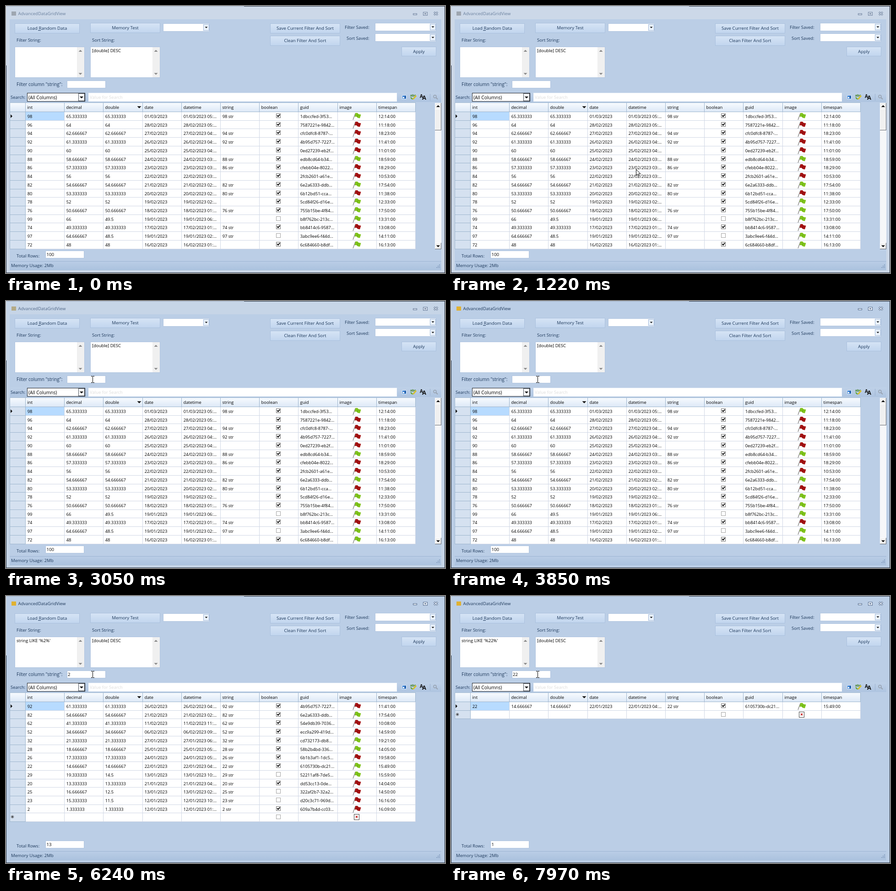
An HTML page with a canvas that plays this animation: 959 px wide and 584 px high, repeating every 8 s.

```html
<!DOCTYPE html>
<html lang="en">
<head>
<meta charset="utf-8">
<title>AdvancedDataGridView</title>
<style>
  html, body { margin: 0; width: 100%; height: 100%; overflow: hidden; background: #bbcee6; }
  canvas { display: block; }
</style>
</head>
<body>
<canvas id="stage" width="959" height="584"></canvas>
<script>
const ctx = document.getElementById('stage').getContext('2d');
const LOOP = 8000, ROW = 18.73, GRID_TOP = 231;
const PANEL = '#bbcee6', NAVY = '#1e395b', LINE = '#d0d7e5', EDGE = '#9eb6ce';
const HEADERS = ['int', 'decimal', 'double', 'date', 'datetime', 'string', 'boolean', 'guid', 'image', 'timespan'];

// int, guid, flag colour, timespan; the other columns follow from int
const records = new Map(`98 1dbccfed-3f53 G 12:14
96 7587221e-9842 R 11:18
94 cfc0dfc8-8787- R 18:23
92 4b95d757-7227 R 11:41
90 0ed27239-eb2f R 11:01
88 edb8cd64-b34 G 18:59
86 cfebb04e-8022 R 18:29
84 2fcb2601-a61e R 10:53
82 6e2a6333-ddb G 17:54
80 6b12bd51-cca R 11:38
78 5cd84f26-d16e G 12:33
76 755b15be-4f84 G 17:50
99 b8f762bc-213c G 13:31
74 bb8414c6-9587 R 13:08
97 3abc9ee6-f44d G 14:11
72 6c684660-b8df G 16:13
62 54e9db39-7036 R 10:08
52 ecc9a299-419d R 14:59
32 cd732173-db8 G 19:21
28 58b2b4bd-336 G 14:05
26 6b1b3af1-1dc5 R 19:58
22 6105730b-dc21 G 15:49
29 52211af8-7de5 G 15:59
20 dd53cc13-0de R 14:04
25 322af2b7-32a2 R 14:50
23 d20c3c71-969d R 16:16
2 609a7b4d-cc03 R 16:09`.split('\n').map(line => {
  const [id, guid, flag, time] = line.split(' ');
  return [+id, { id: +id, guid: guid + '...', flag, time: time + ':00' }];
}));
const allRows = [...records.keys()].slice(0, 16);
const rowsWith2 = [92, 82, 62, 52, 32, 28, 26, 22, 29, 20, 25, 23, 2];

const colX = i => Math.round(42 + 85.2 * i);
const rowY = i => Math.round(GRID_TOP + ROW * i);
const trim = n => String(+n.toFixed(6));
const pad = n => String(n).padStart(2, '0');
const mix = (a, b, u) => a + (b - a) * u;
const blend = (a, b, u) => `rgb(${a.map((v, i) => Math.round(mix(v, b[i], u)))})`;

function cells({ id, guid, time }) {
  const odd = id % 2;
  const day = new Date(Date.UTC(2023, 0, 11 + Math.floor(id / (odd ? 12 : 2))));
  const date = `${pad(day.getUTCDate())}/${pad(day.getUTCMonth() + 1)}/2023`;
  const hour = (odd ? id * 2 : Math.floor(id / 6) + 1) % 12 || 12;
  return [id, trim(id * 2 / 3), trim(odd ? id / 2 : id * 2 / 3), date,
    `${date} ${pad(hour)}:...`, id % 3 ? id + ' str' : '', '', guid, '', time];
}

function fill(x, y, w, h, color) {
  ctx.fillStyle = color;
  ctx.fillRect(x, y, w, h);
}
function shade(y, h, top, bottom) {
  const g = ctx.createLinearGradient(0, y, 0, y + h);
  g.addColorStop(0, top);
  g.addColorStop(1, bottom);
  return g;
}
function box(x, y, w, h, inside, border) {
  fill(x, y, w, h, border);
  fill(x + 1, y + 1, w - 2, h - 2, inside);
}
function text(s, x, middle, size = 9.6, color = NAVY, align = 'left', weight = 400) {
  ctx.font = `${weight} ${size}px "Open Sans", "Noto Sans", sans-serif`;
  ctx.textAlign = align;
  ctx.fillStyle = color;
  ctx.fillText(s, x, middle + 3.5);
}
function poly(points, color, stroke) {
  ctx.beginPath();
  points.forEach(([x, y]) => ctx.lineTo(x, y));
  ctx.closePath();
  ctx.fillStyle = color;
  ctx.fill();
  if (stroke) { ctx.strokeStyle = stroke; ctx.lineWidth = 1; ctx.stroke(); }
}
function path(points, color, width = 1) {
  ctx.beginPath();
  points.forEach(([x, y]) => ctx.lineTo(x, y));
  ctx.strokeStyle = color;
  ctx.lineWidth = width;
  ctx.stroke();
}
// dir 1 points down, -1 points up
function arrow(x, y, r, dir, color) {
  poly([[x - r, y - dir * r / 2], [x + r, y - dir * r / 2], [x, y + dir * r / 2]], color);
}

function button(label, x, y, w, h) {
  box(x, y, w, h, shade(y, h, '#d6e4f5', '#c1d5ee'), '#abc1de');
  text(label, x + w / 2, y + h / 2 - 0.5, 9.7, NAVY, 'center');
}
function combo(x, y, w) {
  box(x, y, w, 18, '#fff', '#b1c5e0');
  box(x + w - 14, y + 2, 13, 14, '#eaf2fc', '#9fb8d9');
  arrow(x + w - 7.5, y + 9, 3, 1, '#111');
}
function memo(x, content) {
  box(x, 89, 153, 68, '#fff', '#b1c5e0');
  fill(x + 136, 90, 16, 66, '#f0f0f0');
  arrow(x + 143.5, 98, 4, -1, '#868686');
  arrow(x + 143.5, 148.5, 4, 1, '#868686');
  text(content, x + 4, 97, 9.5, '#000');
}

function windowFrame(active) {
  fill(0, 0, 959, 584, '#2b3442');
  fill(0, 0, 520, 1, '#a9b7ca');
  fill(0, 0, 1, 130, '#dfe5ee');
  fill(1, 1, 957, 582, blend([204, 216, 232], [187, 206, 230], active));
  fill(8, 29, 943, 549, PANEL);

  fill(12, 12, 10, 9, blend([158, 166, 176], [224, 177, 50], active));
  text('AdvancedDataGridView', 26.5, 16.5, 9.5, blend([106, 128, 158], [30, 57, 91], active));
  ctx.globalAlpha = 0.75 + 0.25 * active;
  box(889, 16, 9, 4, '#eef4fc', '#53698a');
  box(911, 13, 10, 8, '#eef4fc', '#53698a');
  fill(914, 16, 4, 2, '#53698a');
  for (const [color, width] of [['#53698a', 3.6], ['#eef4fc', 1.4]]) {
    path([[935, 13], [943, 20]], color, width);
    path([[943, 13], [935, 20]], color, width);
  }
  ctx.globalAlpha = 1;
}

function topPanel(filter, typed, caret) {
  button('Load Random Data', 19, 38, 142, 22);
  fill(70, 53, 6, 1, NAVY);
  button('Memory Test', 184, 37, 153, 22);
  button('Save Current Filter And Sort', 577, 38, 153, 22);
  button('Clean Filter And Sort', 577, 65, 153, 22);
  button('Apply', 864, 89, 76, 21);
  combo(343, 38, 102);
  combo(806, 37, 134);
  combo(806, 60, 134);
  text('Filter String:', 23, 74);
  text('Sort String:', 188, 74);
  text('Filter Saved:', 740, 46, 9.5);
  text('Sort Saved:', 744, 70, 9.5);
  memo(19, filter);
  memo(184, '[double] DESC');
  text('Filter column "string":', 23, 171, 10);
  box(133, 163, 85, 17, '#fff', '#b1c5e0');
  text(typed, 135, 171, 9.6, '#000');
  if (caret) fill(135 + Math.round(typed.length * 5.5), 164, 1, 13, '#000');
}

function searchBar(hover) {
  fill(8, 189, 943, 21, shade(189, 21, '#bfd1e8', '#aec4e0'));
  text('Search:', 10, 199.5, 9.5);
  box(46, 190, 127, 19, '#fff', '#1f2329');
  box(158, 191, 14, 17, '#f6f7f9', '#4d545d');
  text('(All Columns)', 49, 200.5, 10.2, '#000');
  arrow(165, 200, 4, 1, '#000');
  box(180, 190, 674, 19, '#fff', hover ? '#6d9bd3' : '#f4f7fb');
  text('Value for Search', 183, 199.5, 9.5, '#dcdcdc');

  box(865, 195, 10, 9, '#3f86d6', '#d6e6f8');
  fill(867, 199, 3, 3, '#fff');
  fill(871, 196, 2, 6, '#1c4f96');
  text('abc', 883, 194.5, 7, '#3b7d16', 'left', 700);
  path([[896, 196], [889, 204]], '#d8bf28', 3);
  path([[884, 200], [888, 204]], '#55a020', 2);
  text('A', 904, 197.5, 10, '#111', 'left', 700);
  text('A', 909, 201, 13, '#111', 'left', 700);
  fill(926, 192, 1, 15, '#9db3d0');
  ctx.beginPath();
  ctx.arc(937, 198, 3, 0, 7);
  ctx.strokeStyle = '#96a1af';
  ctx.lineWidth = 1.4;
  ctx.stroke();
  path([[939.5, 200.5], [943, 204]], '#96a1af', 2);
}

function checkbox(middle, checked) {
  box(590, middle - 5, 10, 10, '#fff', checked ? '#707070' : '#a3a3a3');
  if (checked) path([[592.3, middle - 1], [594.3, middle + 1.8], [598.2, middle - 2.6]], '#000', 1.8);
}
function flag(y, kind) {
  const [main, dark] = kind === 'G' ? ['#80c41c', '#62a010'] : ['#a51212', '#780a0a'];
  path([[758, y + 8], [763.3, y - 6.5]], '#8d8d8d', 1.5);
  poly([[763.5, y - 7], [768, y - 7], [770, y - 4.5], [775.5, y - 3.5], [773, y + 4.5], [768, y + 3.5], [766, y + 1], [761.5, y + 1]], main);
  path([[769.5, y - 4], [767, y + 2]], dark, 1);
}

function grid(ids, withNewRow) {
  const count = ids.length + withNewRow;
  const bottom = rowY(count);
  fill(8, 211, 886, 21, shade(211, 21, '#f8fbff', '#dce8f6'));
  fill(8, GRID_TOP, 886, bottom - GRID_TOP, '#fff');
  fill(8, 232, 34, bottom - 232, '#d5e1f0');
  fill(43, 232, 84, rowY(1) - 232, '#b7dbff');

  for (let i = 0; i <= count; i++) {
    fill(42, rowY(i), 852, 1, i ? LINE : EDGE);
    fill(8, rowY(i), 34, 1, EDGE);
  }
  for (let i = 0; i <= 10; i++) {
    fill(colX(i), 211, 1, 21, EDGE);
    fill(colX(i), 232, 1, bottom - 231, i ? LINE : EDGE);
  }
  fill(8, 211, 886, 1, EDGE);
  fill(8, 211, 1, bottom - 210, EDGE);
  HEADERS.forEach((name, i) => text(name, colX(i) + 4.5, 221.5, 9.4, '#000'));
  arrow(291, 221.5, 4.5, 1, '#111');
  poly([[10, 237], [14, 241], [10, 245]], '#111');

  ids.forEach((id, r) => {
    const record = records.get(id), y = Math.round(241 + ROW * r);
    cells(record).forEach((s, i) => text(s, colX(i) + 4.7, y, 9.35, '#000'));
    checkbox(y - 1, id % 2 === 0);
    flag(y, record.flag);
  });
  if (withNewRow) {
    const y = Math.round(241 + ROW * ids.length) - 1;
    for (const [dx, dy] of [[3.5, 0], [0, 3.5], [2.5, 2.5], [2.5, -2.5]])
      path([[14 - dx, y - dy], [14 + dx, y + dy]], '#333', 0.9);
    checkbox(y, false);
    box(760, y - 6, 12, 13, '#fff', '#444');
    path([[764, y - 2], [768, y + 2]], '#c01010', 1.5);
    path([[768, y - 2], [764, y + 2]], '#c01010', 1.5);
  } else {
    fill(937, 212, 14, 320, '#f6f7f9');
    for (const [y, h] of [[212, 14], [225, 47], [518, 14]]) {
      box(937, y, 14, h, '#f0f0f0', '#666a70');
      fill(937, y, 13, 1, '#fff');
      fill(937, y, 1, h - 1, '#fff');
    }
    arrow(944, 219, 4, -1, '#000');
    arrow(944, 525.5, 4, 1, '#000');
  }
}

function footer(total) {
  text('Total Rows:', 23, 546, 9.6);
  box(86, 535, 85, 17, '#fff', '#b1c5e0');
  text(total, 88.5, 543.5, 9.6, '#000');
  fill(8, 558, 943, 20, shade(558, 20, '#bacde6', '#abc2de'));
  fill(8, 558, 943, 1, '#9db5d3');
  text('Memory Usage: 2Mb', 11, 567.5, 9.65);
  for (let i = 0; i < 3; i++)
    for (let j = 0; j <= i; j++) fill(946 - 3 * j, 565 + 3 * i, 2, 2, '#8aa3c4');
}

function pointerAt(t) {
  const k = Math.min(23, Math.floor((t - 460) / 69.5));
  const p = 1 - (1 - k / 23) ** 1.28, bend = 0.566;
  if (p < bend) return [mix(617, 384, p / bend), mix(575, 337, p / bend)];
  const u = (p - bend) / (1 - bend);
  return [mix(384, 189, u), mix(337, 171, u)];
}
function pointer([px, py], overText) {
  const x = Math.round(px), y = Math.round(py);
  if (overText) {
    fill(x, y - 6, 1, 13, '#000');
    for (const dy of [-7, 7]) {
      fill(x - 3, y + dy, 3, 1, '#000');
      fill(x + 1, y + dy, 3, 1, '#000');
    }
  } else {
    poly([[0, 0], [0, 13], [3, 10.3], [5, 15], [7, 14], [5, 9.6], [9.5, 9.6]]
      .map(([a, b]) => [x + 0.5 + a, y + 0.5 + b]), '#fff', '#000');
  }
}

function draw(t) {
  const typed = t < 5710 ? '' : t < 6380 ? '2' : '22';
  const ids = t < 5780 ? allRows : t < 6380 ? rowsWith2 : [22];
  const filtered = t >= 5780;
  const active = t < 3050 ? 0 : Math.min(3, 1 + Math.floor((t - 3050) / 100)) / 3;
  const blinkFrom = t < 5710 ? 3320 : t < 6380 ? 5710 : 6380;
  const caret = t >= 3250 && Math.floor(Math.max(0, t - blinkFrom) / 530) % 2 === 0;

  const pos = t >= 460 && pointerAt(t);
  const inside = (x, y, w, h) => pos && pos[0] >= x && pos[0] < x + w && pos[1] >= y && pos[1] < y + h;
  const overSearch = inside(180, 190, 674, 19);

  windowFrame(active);
  topPanel(filtered ? `string LIKE '%${typed}%'` : '', typed, caret);
  searchBar(overSearch);
  grid(ids, filtered);
  footer(filtered ? ids.length : 100);
  if (pos) pointer(pos, overSearch || inside(133, 163, 85, 17));
}

function tick() {
  draw(performance.now() % LOOP);
  requestAnimationFrame(tick);
}
tick();
</script>
</body>
</html>
```
